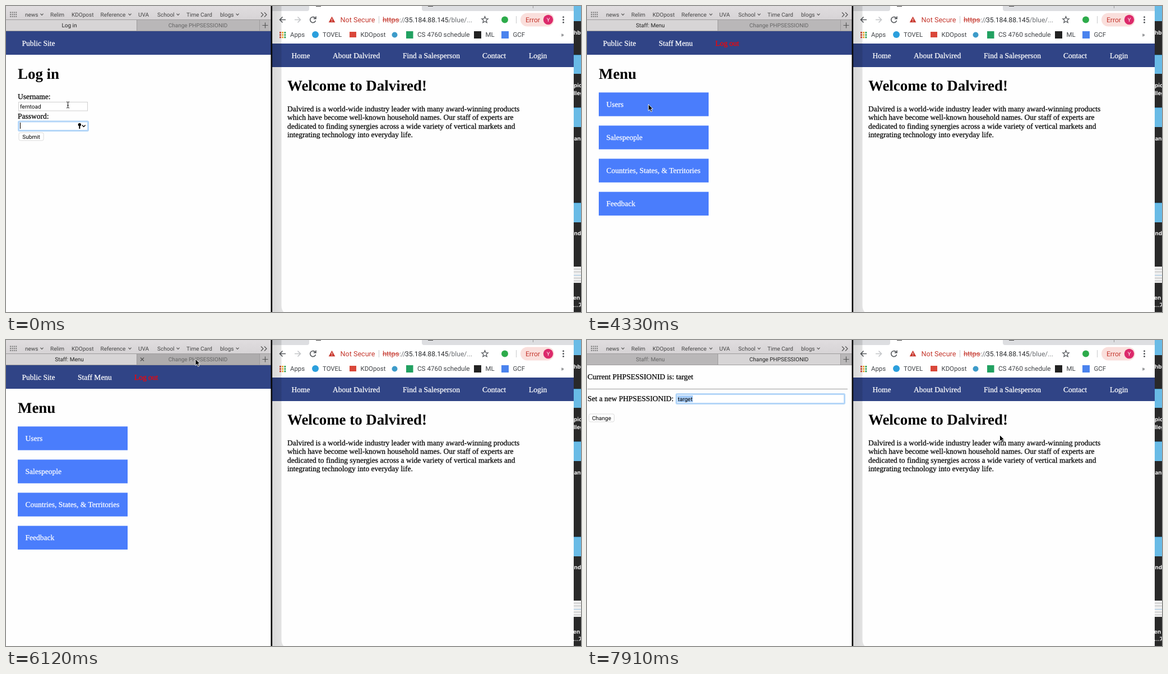
Write an HTML page that moves like this. It is 1026 px wide and 546 px high and loops after 8000 ms.

```html
<!DOCTYPE html>
<html lang="en">
<head>
<meta charset="utf-8">
<title>Session demo</title>
<style>
html, body { margin: 0; width: 100%; height: 100%; overflow: hidden; background: #fff; }
svg { display: block; }
text { font: 13.5px "Liberation Serif", serif; stroke: #000; stroke-width: .25; text-rendering: geometricPrecision; }
.h { font-size: 26.9px; font-weight: bold; stroke: none; }
.nav text, .menu text { fill: #fff; stroke: #fff; }
.nav .out { fill: #f00; stroke: #f00; }
.ui text, text.ui { font: 10px Roboto, sans-serif; stroke: none; }
.bar text { fill: #444; }
.mid { text-anchor: middle; }
.marks text { font-size: 11.4px; fill: #3f4246; }
.url text { font-size: 12.1px; fill: #6a6d71; }
.side text { font: bold 10px Inter, sans-serif; fill: #f4f4f4; stroke: none; }
.line { fill: none; stroke: #555; stroke-width: 1.2; }
.box { fill: #fff; stroke: #cfcfcf; }
.ring { fill: #fff; stroke: #b4d6f8; stroke-width: 3; }
.btn { fill: #fff; stroke: #d2d2d2; stroke-width: .8; }
</style>
</head>
<body>
<svg width="1026" height="546" viewBox="0 0 1026 546">
<defs>
  <path id="chev" class="line" d="M-2.5-1.3 0 1.3 2.5-1.3"/>
  <linearGradient id="shade">
    <stop offset="0" stop-opacity=".15"/><stop offset="1" stop-opacity=".1"/>
  </linearGradient>
  <linearGradient id="steel" x2="0" y2="1">
    <stop offset="0" stop-color="#e0dddf"/><stop offset="1" stop-color="#d6d3d5"/>
  </linearGradient>
</defs>
<rect width="1026" height="546" fill="#fefefe"/>

<!-- left browser -->
<g class="ui bar">
  <rect width="473" height="25" fill="url(#steel)"/>
  <g id="grid"></g>
  <text x="34" y="18.6">news</text><text x="79" y="18.6">Relim</text>
  <text x="117" y="18.6">KDOpost</text><text x="168.5" y="18.6">Reference</text>
  <text x="236" y="18.6">UVA</text><text x="270" y="18.6">School</text>
  <text x="322" y="18.6">Time Card</text><text x="382" y="18.6">blogs</text>
  <use href="#chev" x="64" y="15"/><use href="#chev" x="221" y="15"/>
  <use href="#chev" x="307" y="15"/><use href="#chev" x="413" y="15"/>
  <path class="line" d="M455 11.5l4 4-4 4M461 11.5l4 4-4 4"/>
  <rect id="tab1" y="25" width="233" height="19"/>
  <rect id="tab2" x="233" y="25" width="220" height="19"/>
  <rect x="453" y="25" width="20" height="19" fill="#b9b7b8"/>
  <path d="M0 24.5H473M0 44.5H473M233.5 25V44M452.5 25V44" stroke="#9d9b9c"/>
  <path class="line" d="M457.5 34.5h10M462.5 29.5v10"/>
  <text id="title1" class="mid" x="113" y="38.2"></text>
  <text id="title2" class="mid" x="342.5" y="38.2">Change PHPSESSIONID</text>
  <path id="close" class="line" d="M240 31.5l6 6M246 31.5l-6 6"/>
</g>

<g id="staff">
  <rect y="45" width="473" height="42" fill="#304486"/>
  <g class="nav"><text x="28.5" y="71">Public Site</text></g>
</g>

<g id="login">
  <text class="h" x="21" y="130">Log in</text>
  <text x="21" y="166">Username:</text>
  <rect class="box" x="22.5" y="171.5" width="123" height="15.5"/>
  <text class="ui" x="25" y="183">ferntoad</text>
  <text x="21" y="201">Password:</text>
  <rect class="ring" x="22.5" y="206" width="124" height="16.5" rx="1.5"/>
  <g id="dots"></g>
  <rect id="caret" y="208" width="1" height="11"/>
  <circle cx="131.3" cy="211.8" r="2.7"/><path d="M131.3 213v6" stroke="#000" stroke-width="2"/>
  <path d="M135.8 212.5l2.9 3 2.9-3" fill="none" stroke="#000" stroke-width="1.4"/>
  <rect class="btn" x="23" y="226" width="44" height="14" rx="2.5"/>
  <text class="ui mid" x="45" y="236.5">Submit</text>
</g>

<g id="menu">
  <g class="nav"><text x="128" y="71">Staff Menu</text><text class="out" x="229" y="71">Log out</text></g>
  <text class="h" x="21" y="130">Menu</text>
  <g id="items" class="menu"></g>
</g>

<g id="session">
  <text x="1" y="70">Current PHPSESSIONID is: target</text>
  <path d="M1 87.5H465" stroke="#9c9c9c"/>
  <text x="1" y="109">Set a new PHPSESSIONID:</text>
  <rect class="box" x="159.5" y="97.5" width="300" height="15"/>
  <rect id="focus" class="ring" x="159.5" y="96.5" width="300" height="17" rx="1.5"/>
  <rect id="mark" x="161.5" y="99" width="27.5" height="12" fill="#a6cdf9"/>
  <text class="ui" x="162" y="108.7">target</text>
  <rect class="btn" x="3.5" y="132" width="45" height="14" rx="2.5"/>
  <text class="ui mid" x="26" y="142.7">Change</text>
</g>

<!-- right browser -->
<rect x="475" width="538" height="67" fill="#fff"/>
<path d="M475 0H541V5q0 4-4 4H475zM742 0H1013V9H746q-4 0-4-4z" fill="#dddee1"/>
<path d="M553 0h9M753 0h9" stroke="#444" stroke-width="2"/>
<path d="M940.5 0V4" stroke="#999"/>
<g fill="none" stroke="#55585c" stroke-width="1.6">
  <path d="M499 24.5H488.5M493.5 19.5l-5 5 5 5"/>
  <path d="M515 24.5H525.5M520.5 19.5l5 5-5 5" stroke="#c3c5c8"/>
  <path d="M552 22a5 5 0 1 0 .5 4M553 18.5v4.2h-4.2"/>
  <path d="M854.5 18.8l1.6 3.8 4.1.3-3.1 2.7 1 4-3.6-2.2-3.6 2.2 1-4-3.1-2.7 4.1-.3z" stroke-width="1.3"/>
  <path d="M665.5 18V31M910.5 18V31" stroke="#c9cacc" stroke-width="1"/>
</g>
<path d="M581.5 18.8l5.8 10.4h-11.6z" fill="#c93a30"/><path d="M581.5 22.5v3.2M581.5 26.8v1.2" stroke="#fff"/>
<g class="ui url">
  <text x="596.5" y="29" style="font-size:12.6px;fill:#c5392f">Not Secure</text>
  <text x="672" y="29" style="font-size:12.9px;fill:#c5392f">https</text>
  <path d="M672 25H702" stroke="#c5392f"/>
  <text x="702" y="29">://</text>
  <text x="712" y="29" style="fill:#27292c">35.184.88.145</text>
  <text x="789.5" y="29">/blue/...</text>
  <circle cx="890" cy="24.5" r="6" fill="#2dab4b"/>
  <rect x="918" y="12.5" width="60" height="24" rx="12" fill="#fadfdc"/>
  <text x="927" y="29" style="fill:#c5392f">Error</text>
  <circle cx="967.5" cy="24.5" r="8.7" fill="#dc2a6b"/>
  <text class="mid" x="967.5" y="28" style="font-size:9.5px;fill:#fff">Y</text>
  <g fill="#55585c"><circle cx="994.5" cy="19.8" r="1.5"/><circle cx="994.5" cy="24.5" r="1.5"/><circle cx="994.5" cy="29.2" r="1.5"/></g>
</g>
<g id="apps"></g>
<circle cx="552" cy="51" r="6" fill="#2b9fdd"/>
<rect x="613" y="46" width="12" height="10" fill="#d9473a"/>
<circle cx="693.5" cy="51.5" r="5" fill="#3d9bc9"/>
<rect x="714" y="45" width="12.5" height="13" fill="#22a161"/>
<rect x="835" y="45" width="13" height="13" fill="#222"/>
<rect x="884" y="45" width="13" height="13" fill="#4a83ee"/>
<g class="ui marks">
  <text x="507" y="55.2">Apps</text><text x="565" y="55.2">TOVEL</text>
  <text x="632.5" y="55.2">KDOpost</text><text x="734" y="55.2" style="font-size:11.7px">CS 4760 schedule</text>
  <text x="855.5" y="55.2">ML</text><text x="904.5" y="55.2">GCF</text>
  <text x="990" y="55">»</text>
</g>
<rect x="475" y="67" width="538" height="42" fill="#304486"/>
<g class="nav">
  <text x="509.5" y="93">Home</text><text x="583" y="93">About Dalvired</text>
  <text x="708" y="93">Find a Salesperson</text><text x="850" y="93">Contact</text><text x="933" y="93">Login</text>
</g>
<text class="h" x="502" y="151">Welcome to Dalvired!</text>
<text x="502" y="188">Dalvired is a world-wide industry leader with many award-winning products</text>
<text x="502" y="203.3">which have become well-known household names. Our staff of experts are</text>
<text x="502" y="218.6">dedicated to finding synergies across a wide variety of vertical markets and</text>
<text x="502" y="233.9">integrating technology into everyday life.</text>
<path d="M475 0H491.5V534q0 8 4 12H475z" fill="url(#shade)"/>
<rect x="472.5" width="2.6" height="546" fill="#080808"/>

<!-- desktop edge -->
<g class="side">
  <rect x="1013" width="13" height="546" fill="#292929"/>
  <path d="M1013 0h13V27h-13zM1013 87h13v34h-13zM1013 181h13v35h-13zM1013 351h13v35h-13z" fill="#69bbe6"/>
  <path d="M1013 87.5h13M1013 181.5h13M1013 351.5h13" stroke="#3f8fbd"/>
  <rect x="1013" y="465" width="13" height="29" fill="#eee"/>
  <path d="M1013 469.5h13M1013 474.5h13M1013 485.5h13M1013 490.5h13" stroke="#bbb"/>
  <path d="M1013 480.5h13" stroke="#9cc4e4"/>
  <text x="1013" y="50.5">hb</text><text x="1013" y="145">pic</text><text x="1013" y="158.5">lleg</text>
  <text x="1013.5" y="240">an</text><text x="1013.5" y="409">nd</text>
  <text x="1012" y="523.5">en</text><text x="1012" y="537">…7</text>
</g>

<g id="pointer" stroke-linejoin="round">
  <path id="arrow" d="M0 0V11.5L2.7 9 4.6 13.3 6.7 12.4 4.8 8.2H8.2Z" stroke="#fff" stroke-width=".9"/>
  <path id="beam" d="M-2.5-5.5Q0-5.5 0-4V4Q0 5.5-2.5 5.5M2.5-5.5Q0-5.5 0-4M2.5 5.5Q0 5.5 0 4M-1.3.9H1.3" fill="none" stroke="#111"/>
  <path id="hand" d="M-3-5q0-1.3 1.1-1.3T-.8-5V-1.6q1.5-1 2.1.2 1.4-.7 1.9.5 1.6-.4 1.8 1V3L3.7 5V7H-2V5L-5.2.8q-.5-1.4.7-1.5L-3 .8Z" fill="#fff" stroke="#111"/>
</g>
</svg>
<script>
const $ = id => document.getElementById(id);
const show = (id, on) => $(id).setAttribute("display", on ? "inline" : "none");
const many = (n, draw) => Array.from({ length: n }, (_, i) => draw(i)).join("");
const rect = (x, y, w, h, fill) => `<rect x="${x}" y="${y}" width="${w}" height="${h}" fill="${fill}"/>`;

$("grid").innerHTML = many(12, i => rect(7 + i % 4 * 3.4, 10.5 + (i >> 2) * 3.6, 2, 2, "#777"));
$("apps").innerHTML = many(9, i =>
  rect(488 + i % 3 * 4.2, 46 + (i / 3 | 0) * 4.2, 2.9, 2.9, ["#d94b3d", "#e9a32b", "#35a25a", "#4a83ee"][(i + (i / 3 | 0)) % 4]));
$("items").innerHTML = ["Users", "Salespeople", "Countries, States, &amp; Territories", "Feedback"].map((s, i) =>
  rect(21, 154.3 + i * 59.1, 196, 42.3, "#4a7dfc") + `<text x="34.5" y="${180 + i * 59.1}">${s}</text>`).join("");

const pitch = 4.84;
$("dots").innerHTML = many(12, i => `<circle cx="${27.8 + i * pitch}" cy="214.3" r="1.7"/>`);
const dots = [...$("dots").children];

// time, characters typed, caret visible
const typing = [[0, 0, 1], [440, 0, 0], [590, 1, 1], [760, 2, 1], [910, 3, 1], [1360, 4, 1], [1660, 5, 1],
  [2110, 5, 0], [2400, 7, 1], [2700, 8, 1], [2990, 9, 1], [3130, 10, 1], [3280, 11, 1], [3430, 12, 1]];

// time, x, y, pointer shape
const path = [[0, 110.5, 176.5, "beam"], [4180, 109.5, 175.5, "arrow"], [4480, 112, 181, "hand"],
  [4780, 122, 252, "hand"], [4930, 134, 208, "hand"], [5080, 141.5, 161.5, "hand"], [5230, 152, 108, "arrow"],
  [5530, 190, 78, "arrow"], [5680, 245, 46, "arrow"], [5820, 296, 18, "arrow"], [5970, 327, 10, "arrow"],
  [6120, 338, 34, "arrow"], [6420, 334, 36, "arrow"], [6570, 316, 39, "arrow"], [6720, 250, 104, "beam"],
  [6870, 184, 104, "beam"], [7320, 330, 92, "arrow"], [7470, 530, 64, "arrow"], [7620, 700, 82, "arrow"],
  [7760, 795, 132, "arrow"], [7910, 736.5, 169.5, "arrow"]];

const at = (keys, t) => keys.findLast(k => k[0] <= t);

function frame() {
  const t = performance.now() % 8000;
  const second = t >= 6270, loggedIn = t >= 4330, hover = t >= 5970 && t < 6720;

  show("staff", !second);
  show("login", !loggedIn);
  show("menu", loggedIn && !second);
  show("session", second);
  show("focus", t >= 6720);
  show("mark", t >= 7170);
  show("close", hover);
  $("title1").textContent = loggedIn ? "Staff: Menu" : "Log in";
  $("title1").style.fill = second ? "#666" : "#222";
  $("title2").style.fill = second ? "#222" : "#666";
  $("tab1").setAttribute("fill", second ? "#b9b7b8" : "#d7d5d6");
  $("tab2").setAttribute("fill", second ? "#d7d5d6" : hover ? "#aeacad" : "#b9b7b8");

  const [, typed, caret] = at(typing, t);
  dots.forEach((d, i) => d.setAttribute("display", i < typed ? "inline" : "none"));
  show("caret", caret);
  $("caret").setAttribute("x", 25 + typed * pitch);

  const [, x, y, shape] = at(path, t);
  $("pointer").setAttribute("transform", `translate(${x} ${y})`);
  for (const s of ["arrow", "beam", "hand"]) show(s, s === shape);
  requestAnimationFrame(frame);
}
frame();
</script>
</body>
</html>
```
